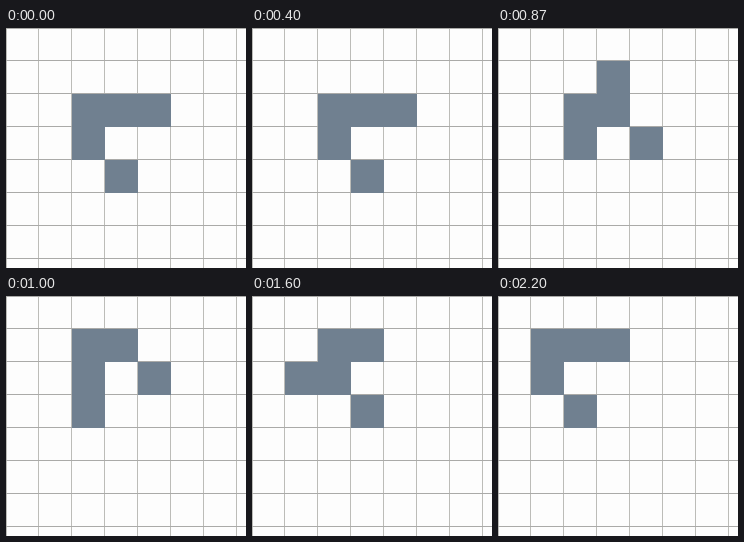
These frames come from a looping animation (240x240 px, 2270 ms). An HTML page:

```html
<!DOCTYPE html>
<html lang="en">
<head>
<meta charset="utf-8">
<title>Glider</title>
<style>
html, body { margin: 0; width: 100%; height: 100%; overflow: hidden; background: #fdfdfd; }
svg { display: block; width: 100%; height: 100%; }
</style>
</head>
<body>
<svg viewBox="0 0 240 240" shape-rendering="crispEdges">
  <rect width="240" height="240" fill="#fdfdfd"/>
  <path id="columns" fill="#bcbcb8"/>
  <path id="rows" fill="#aaaaa8"/>
  <path id="cells" fill="#708090"/>
</svg>
<script>
const LOOP = 2270, FIRST = 430, STEP = 500, COUNT = 8;
const byId = id => document.getElementById(id);
const line = i => Math.floor(i * 32.95);
const box = (x, y, w, h) => `M${x} ${y}h${w}v${h}h${-w}z`;
const indexes = Array.from({ length: COUNT }, (_, i) => i);

byId('columns').setAttribute('d', indexes.map(i => box(line(i), 0, 1, 240)).join(''));
byId('rows').setAttribute('d', indexes.map(i => box(0, line(i), 240, 1)).join(''));

// Conway's rules on a list of [column, row] cells
function evolve(cells) {
  const alive = (x, y) => cells.some(c => c[0] === x && c[1] === y);
  const next = [];
  for (const y of indexes) for (const x of indexes) {
    const near = cells.filter(c =>
      Math.max(Math.abs(c[0] - x), Math.abs(c[1] - y)) === 1).length;
    if (near === 3 || (near === 2 && alive(x, y))) next.push([x, y]);
  }
  return next;
}

const cellPath = ([x, y]) => {
  const left = line(x) + 1, top = line(y) + 1;
  return box(left, top, line(x + 1) + 1 - left, line(y + 1) + 1 - top);
};

const generations = [[[2, 2], [3, 2], [4, 2], [2, 3], [3, 4]]];
while (generations.length < 5) generations.push(evolve(generations.at(-1)));
const paths = generations.map(cells => cells.map(cellPath).join(''));

function draw(time) {
  const t = time % LOOP;
  const generation = t < FIRST ? 0 : Math.min(4, 1 + Math.floor((t - FIRST) / STEP));
  byId('cells').setAttribute('d', paths[generation]);
}

const start = performance.now();
function tick() {
  draw(performance.now() - start);
  requestAnimationFrame(tick);
}
tick();
</script>
</body>
</html>
```
